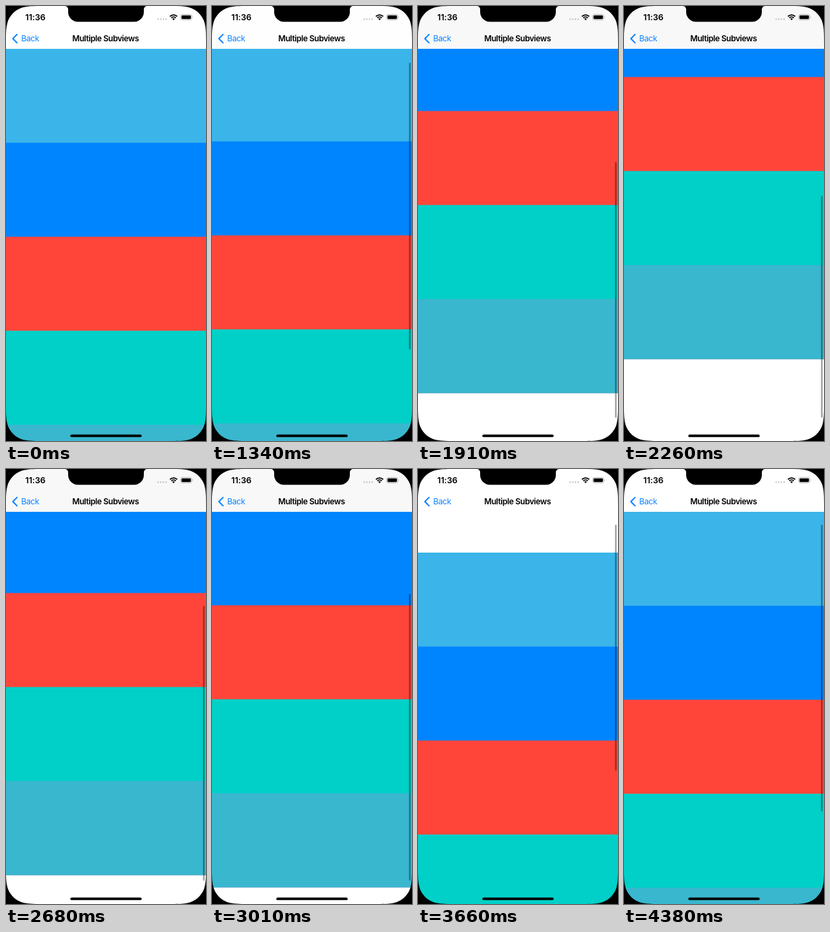
Write an HTML page that moves like this. It is 296 px wide and 640 px high and loops after 4.44 s.

```html
<!DOCTYPE html>
<html lang="en">
<head>
<meta charset="utf-8">
<title>Multiple Subviews</title>
<style>
  html, body { margin: 0; width: 100%; height: 100%; overflow: hidden; background: #000; }
  svg { display: block; width: 296px; height: 640px; }
  text { font-family: Inter, "Liberation Sans", sans-serif; font-size: 12px; letter-spacing: -.44px; }
  .bold { font-weight: 600; }
  .line { fill: none; stroke: #000; }
</style>
</head>
<body>
<svg viewBox="0 0 296 640">
  <rect width="296" height="640" fill="#fff"/>
  <g id="content"></g>

  <rect id="bar" width="296" height="63" fill="#fff"/>
  <path d="M16.3 41.9L10.2 48L16.3 54.1" class="line" style="stroke:#0a84ff" stroke-width="2" stroke-linecap="round" stroke-linejoin="round"/>
  <text x="22.6" y="52.2" fill="#0a84ff">Back</text>
  <text x="98" y="52.2" class="bold">Multiple Subviews</text>

  <text x="28.5" y="21" class="bold" style="font-size:12.4px;letter-spacing:-.1px">11:36</text>
  <path d="M225.3 19.4H238" class="line" style="stroke:#bdbdbd" stroke-width="2.2" stroke-linecap="round" stroke-dasharray="0 3.9"/>
  <path d="M242.6 15.4A7.6 7.6 0 0 1 253.4 15.4M244.7 17.5A4.7 4.7 0 0 1 251.3 17.5" class="line" stroke-width="1.8"/>
  <path d="M248 20.9L246.1 19A2.7 2.7 0 0 1 249.9 19Z"/>
  <rect x="258.4" y="12.4" width="16.6" height="8.2" rx="2.5" class="line" style="stroke:#b0b0b0" stroke-width=".8"/>
  <rect x="259.7" y="13.7" width="14" height="5.6" rx="1.4"/>
  <path d="M276 15.1Q277.3 16.5 276 17.9Z" fill="#b0b0b0"/>

  <rect id="thumb" x="291.6" width="2.3" rx="1.15" fill-opacity=".38"/>
  <rect x="95.2" y="630.5" width="105.6" height="3.8" rx="1.9"/>

  <path id="corner" d="M0 0V54.9C0 39.1 0 31.2 2.7 22.7C6.1 13.4 13.4 6.1 22.7 2.7C31.2 0 39.1 0 54.9 0Z"/>
  <use href="#corner" transform="translate(296 0) scale(-1 1)"/>
  <use href="#corner" transform="translate(0 640) scale(1 -1)"/>
  <use href="#corner" transform="translate(296 640) scale(-1)"/>
  <path d="M87 0A5 5 0 0 1 92 5V8.7A14.5 14.5 0 0 0 106.5 23.2H189.5A14.5 14.5 0 0 0 204 8.7V5A5 5 0 0 1 209 0Z"/>
</svg>
<script>
const LOOP = 4440, TOP = 63, VIEW = 640 - TOP;
const PITCH = 138.25, MAX = 139.2, THUMB = 422;
const START = 1340, RELEASE_END = 2460, GRAB = 3010, RELEASE_TOP = 3850;
const colors = ['#3bb5e9', '#0085ff', '#ff453a', '#00d0c8', '#39b7ce'];
const $ = id => document.getElementById(id);
const content = $('content'), bar = $('bar'), thumb = $('thumb');
const clamp = (x, low, high) => Math.min(high, Math.max(low, x));

function set(el, attrs) {
  for (const key in attrs) el.setAttribute(key, attrs[key]);
}

// Each block reaches down to the end and is covered by the next, so no seams show.
colors.forEach((fill, i) => {
  const block = document.createElementNS('http://www.w3.org/2000/svg', 'rect');
  const height = (colors.length - i) * PITCH;
  set(block, { y: TOP + i * PITCH, width: 296, height, fill });
  content.append(block);
});

// Finger travel, a little faster at the start.
function drag(from, distance, t, start, end) {
  return from + distance * clamp((t - start) / (end - start), 0, 1) ** 0.876;
}

// Content follows the finger, with growing resistance past either end.
function resist(finger) {
  const inside = clamp(finger, 0, MAX);
  const pull = 0.55 * (finger - inside);
  return inside + pull * VIEW / (VIEW + Math.abs(pull));
}

// Critically damped return to an end after the finger lifts.
function settle(from, rest, ms) {
  const x = 0.014 * ms;
  return rest + (from - rest) * (1 + x) * Math.exp(-x);
}

const pullUp = t => resist(drag(1, 348, t, START, 2260));
const pullDown = t => resist(drag(140, -328, t, GRAB, RELEASE_TOP));

function offsetAt(t) {
  if (t < START) return 0;
  if (t < RELEASE_END) return pullUp(t);
  if (t <= GRAB) return settle(pullUp(RELEASE_END), MAX, t - RELEASE_END);
  if (t < RELEASE_TOP) return pullDown(t);
  return settle(pullDown(RELEASE_TOP), 0, t - RELEASE_TOP);
}

function draw() {
  const now = performance.now() % LOOP;
  const offset = Math.round(offsetAt(now));
  const inside = clamp(offset, 0, MAX);
  const squeeze = Math.abs(offset - inside);
  const shade = 255 - Math.round(7 * clamp((offset - 1) / 12, 0, 1));

  set(content, { transform: `translate(0 ${-offset})` });
  set(bar, { fill: `rgb(${shade},${shade},${shade})` });
  set(thumb, {
    visibility: now < START ? 'hidden' : 'visible',
    y: 82 + inside * THUMB / VIEW + (offset > MAX ? squeeze : 0),
    height: THUMB - squeeze
  });
  requestAnimationFrame(draw);
}
draw();
</script>
</body>
</html>
```
